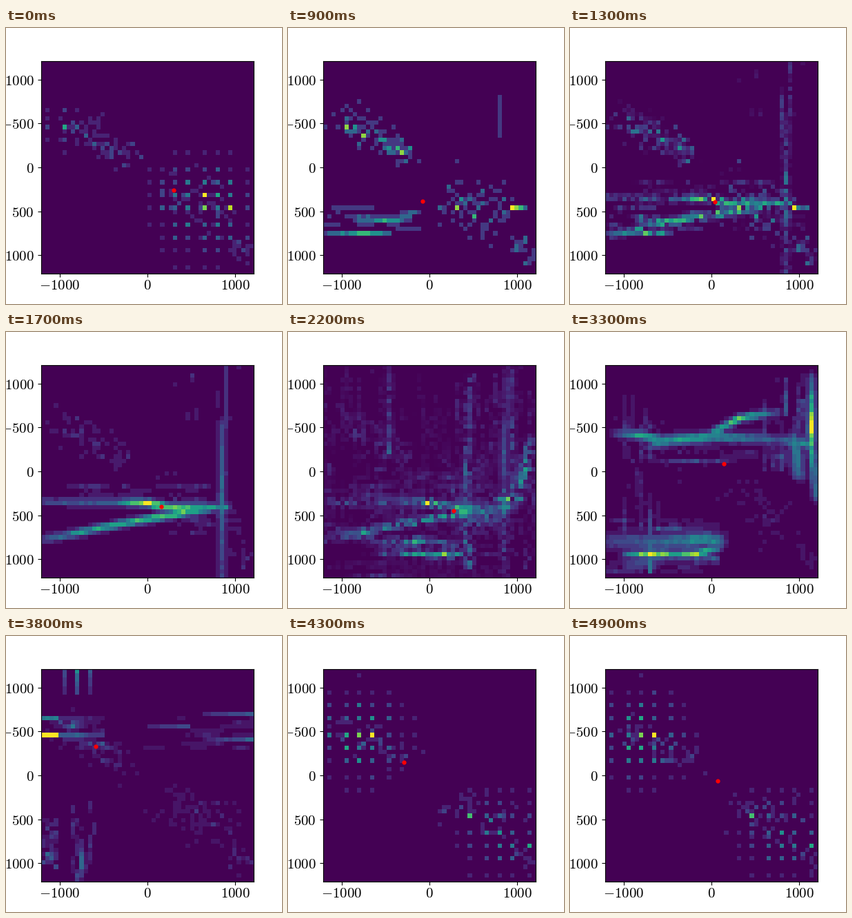
These frames come from a looping animation (400 by 400 pixels, 5 s). A matplotlib script:

```python
import numpy as np
import matplotlib.pyplot as plt
from matplotlib.animation import FuncAnimation

plt.rcParams["mathtext.fontset"] = "cm"

N = 50          # cells per side
FRAMES = 50
LIMIT = 1212.5
ROW, COL = np.mgrid[:N, :N]
LATTICE = np.floor(1.75 + 3.322 * np.arange(15)).astype(int)


class HitMap:
    """A square histogram with a whole number of count levels."""

    def __init__(self, seed, counts):
        self.rng = np.random.default_rng(seed)
        self.counts = counts
        self.z = np.zeros((N, N))

    def clusters(self, hits):
        """Single hits scattered along the two diagonal bands."""
        bands = ((4, 13, 20, 22, 1.9, .5), (30, 31, 42, 36, 3, .4),
                 (45, 42, 48, 46, 1.3, .1))
        for c0, r0, c1, r1, spread, share in bands:
            n = int(hits * share)
            t = self.rng.random(n)
            c = c0 + t * (c1 - c0) + self.rng.normal(0, spread, n)
            r = r0 + t * (r1 - r0) + self.rng.normal(0, spread, n)
            c, r = (np.clip(np.rint(v), 0, N - 1).astype(int) for v in (c, r))
            np.add.at(self.z, (r, c), 1 / self.counts)

    def track(self, *points, width=.9):
        """Soft path through (column, row, level) key points."""
        path = np.array(points, float)
        knots = np.arange(len(path))
        t = np.linspace(0, knots[-1], 120)
        c, r, level = (np.interp(t, knots, path[:, k]) for k in range(3))
        gap = np.hypot(COL[..., None] - c, ROW[..., None] - r)
        profile = level[gap.argmin(-1)] * np.exp(-(gap.min(-1) / width) ** 2)
        rough = self.rng.uniform(.72, 1, (N, N))
        self.z = np.maximum(self.z, profile * rough)

    def streaks(self, c0, r0, c1, r1, n, level, length, upright=False):
        """Overlapping straight runs of low counts inside a region."""
        for _ in range(n):
            c, r = self.rng.integers(c0, c1 + 1), self.rng.integers(r0, r1 + 1)
            size = self.rng.integers(1, length + 1)
            if upright:
                run = np.s_[r:min(r + size, r1 + 1), c]
            else:
                run = np.s_[r, c:min(c + size, c1 + 1)]
            self.z[run] += level * self.rng.uniform(.4, 1, self.z[run].shape)

    def lattice(self, c, r, reach, level):
        """Crossings of wire pairs, fading away from a bright centre."""
        wc, wr = (np.exp(-((LATTICE - v) / reach) ** 2) for v in (c, r))
        rough = self.rng.uniform(.5, 1, (len(LATTICE), len(LATTICE)))
        cells = np.ix_(LATTICE, LATTICE)
        self.z[cells] = np.maximum(self.z[cells], level * np.outer(wr, wc) * rough)
        self.z[r, c] = level

    def done(self):
        return np.rint(np.clip(self.z, 0, 1) * self.counts) / self.counts


def opening(seed):
    m = HitMap(seed, 10)
    m.clusters(150)
    m.lattice(5, 15, 4, .65)
    m.lattice(38, 34, 10, .75)
    m.lattice(38, 31, 1, 1)
    m.lattice(44, 34, 1, .9)
    return m.done()


def first_tracks():
    m = HitMap(9, 6)
    m.clusters(215)
    m.lattice(5, 15, 1, .85)
    m.lattice(31, 34, 1, .85)
    m.track((44, 34, 1.2), (47, 34, .5), width=.4)
    m.track((41, 8, .22), (41, 17, .22), width=.4)
    m.track((2, 34, .22), (11, 34, .22), width=.4)
    m.track((7, 36.5, .4), (17, 37, .6), (20, 36, .3))
    m.track((0, 40, .22), (5, 40, .4), (9, 40, .9), (15, 40, .3), width=.6)
    m.streaks(0, 34, 24, 40, 14, .17, 5)
    return m.done()


def crossing():
    m = HitMap(17, 14)
    m.clusters(130)
    m.streaks(0, 28, 38, 31, 18, .08, 9)
    m.streaks(30, 34, 46, 40, 14, .1, 5)
    m.streaks(31, 0, 49, 12, 8, .08, 9, upright=True)
    m.track((0, 31.7, .25), (17, 31.8, .38), (25, 32, 1.1), (29, 33, .9),
            (43, 33, .55))
    m.track((0, 40.5, .28), (10, 38.6, .62), (21, 36.3, .85), (33, 34.2, .9),
            (39, 33.5, .4))
    m.track((42, 13, .2), (42, 30, .45), (42, 49, .2))
    m.track((43, 0, .18), (43, 14, .18), width=.5)
    return m.done()


def sweep():
    m = HitMap(27, 24)
    m.clusters(110)
    m.streaks(0, 0, 49, 40, 150, .04, 18, upright=True)
    m.streaks(28, 0, 49, 35, 50, .07, 12, upright=True)
    m.streaks(0, 22, 40, 49, 150, .05, 12)
    m.track((15, 0, .12), (15, 20, .35), width=.8)
    m.track((44, 0, .2), (44, 30, .38))
    m.track((34, 3, .2), (33, 33, .5), (34, 47, .5), width=1.1)
    m.track((48, 18, .5), (47, 24, .55), (44.5, 31, .55), (40, 35, .4),
            (33, 37, .4), width=1.6)
    m.track((40, 31, .35), (44, 31, 1.1), (46, 31, .65), width=.5)
    m.track((2, 38, .2), (14, 41, .4), (23, 41, .75), (31, 42, .4), width=1.1)
    m.track((13, 43.7, .35), (27, 44, .85), (32, 44, .9))
    return m.done()


def twin_arcs():
    m = HitMap(33, 18)
    m.clusters(110)
    m.streaks(0, 36, 26, 48, 75, .08, 9)
    m.streaks(4, 7, 12, 48, 28, .09, 10, upright=True)
    m.streaks(37, 2, 49, 24, 45, .1, 9, upright=True)
    m.streaks(8, 17, 44, 22, 26, .07, 9)
    m.track((1, 15.5, .1), (8, 16, .85), (13, 17, .55), (24, 16, .55),
            (31, 12, .85), (40, 10.5, .25))
    m.track((11, 18, .4), (16, 17, .65), (26, 16.3, .55), (40, 17, .3),
            (47, 18, .6), width=1.2)
    m.track((48, 2, .3), (48, 14.5, 1.1), (48, 19, .7), (49, 31, .3))
    m.track((44, 17, .45), (45, 25, .45), width=1.4)
    m.track((4, 44, .35), (10, 44, 1.1), (15, 44, .7), (21, 44, .9),
            (26, 42.5, .5))
    m.track((1, 41, .25), (14, 41, .4), (23, 40.5, .55), (26, 41, .5), width=1.7)
    m.track((10, 34, .2), (10, 48, .45), width=.6)
    return m.done()


def left_edge():
    m = HitMap(38, 18)
    m.clusters(200)
    m.streaks(0, 35, 3, 46, 28, .12, 4)
    m.streaks(7, 31, 12, 49, 20, .12, 7, upright=True)
    m.streaks(4, 11, 14, 18, 18, .09, 6)
    m.streaks(24, 11, 49, 18, 22, .08, 9)
    for c, level in ((5, .28), (8, .5), (11, .28)):
        m.track((c, 0, level), (c, 5, level / 2), width=.4)
    for r, level in ((11, .48), (15, 1.2)):
        m.track((0, r, level), (3, r, level), width=.4)
        m.track((4, r, level / 3), (14, r, level / 7), width=.4)
    for r in (10, 16):
        m.track((38, r, .1), (49, r, .35), width=.5)
    m.track((25, 13, .14), (34, 13, .25), width=.5)
    return m.done()


def closing(seed):
    m = HitMap(seed, 10)
    m.clusters(105)
    m.lattice(8, 15, 9, .75)
    m.lattice(11, 15, 1, 1)
    m.lattice(41, 38, 9, .5)
    m.lattice(34, 34, 1, .7)
    m.lattice(48, 41, 1, .55)
    return m.done()


SCENES = [(0, opening(4)), (6, opening(6)), (9, first_tracks()),
          (17, crossing()), (27, sweep()), (33, twin_arcs()),
          (38, left_edge()), (43, closing(43)), (49, closing(49))]

# time, x and y of the marker
DOT_KEYS = np.array([(0, 302, 262), (9, -75, 382), (17, 160, 405),
                     (27, 398, 490), (33, 138, -85), (38, -594, -330),
                     (49, 67, 60)]).T

DELAY = np.random.default_rng(1).random((N, N))


def heat(i):
    """Each cell passes from one scene to the next after its own delay."""
    for (t0, a), (t1, b) in zip(SCENES, SCENES[1:]):
        if i <= t1:
            mix = np.clip(2 * (i - t0) / (t1 - t0) - DELAY, 0, 1)
            z = a + (b - a) * mix
            return z / z.max()


fig = plt.figure(figsize=(4, 4), dpi=100)
ax = fig.add_subplot()
image = ax.imshow(heat(0), cmap="viridis", vmin=0, vmax=1,
                  interpolation="nearest",
                  extent=(-LIMIT, LIMIT, LIMIT, -LIMIT))
dot, = ax.plot([], [], "r.", markersize=7)
ax.set_xlim(-LIMIT, LIMIT)
ax.set_ylim(LIMIT, -LIMIT)
xs, ys = range(-1000, 1001, 1000), range(-1000, 1001, 500)
ax.set_xticks(xs, [f"${v}$" for v in xs], fontsize=15)
ax.set_yticks(ys, [f"${v}$" for v in ys], fontsize=15)
ax.tick_params(axis="x", pad=1.4)
ax.tick_params(axis="y", pad=4)


def update(i):
    image.set_data(heat(i))
    times, x, y = DOT_KEYS
    dot.set_data([np.interp(i, times, x)], [np.interp(i, times, y)])
    return image, dot


anim = FuncAnimation(fig, update, frames=FRAMES, interval=100,
                     repeat=True, repeat_delay=0)
plt.show()
```
